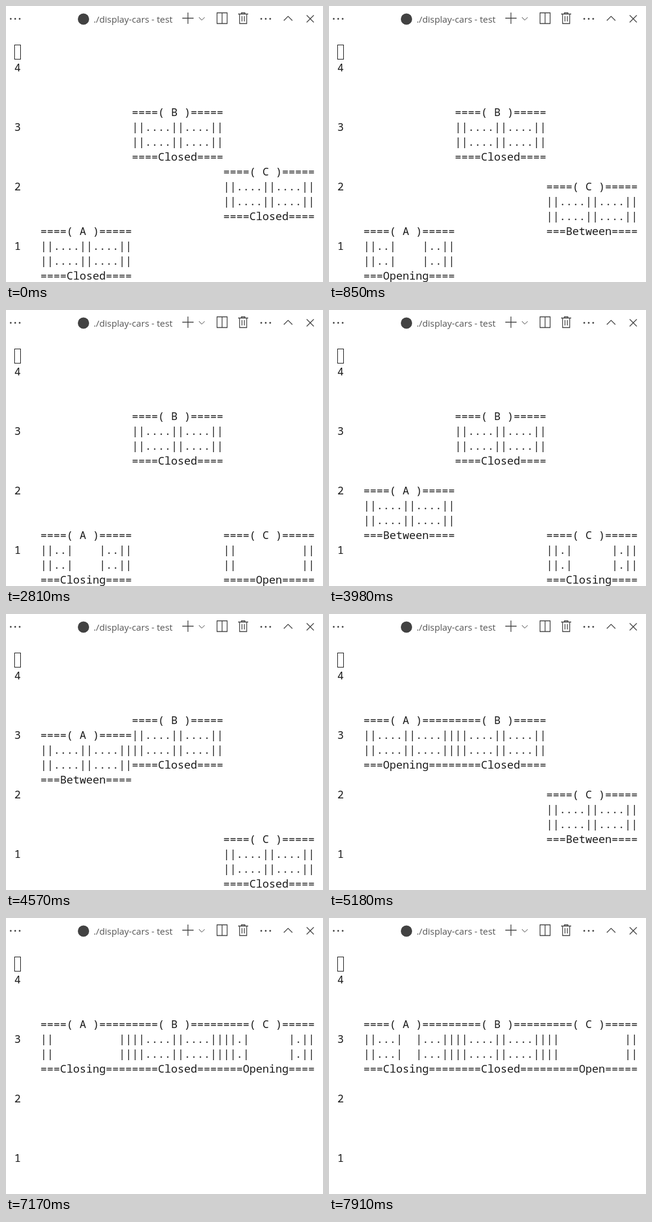
These frames come from a looping animation (534 by 464 pixels, 8 s). An HTML page with a canvas:

```html
<!DOCTYPE html>
<html lang="en">
<head>
<meta charset="utf-8">
<title>Elevator cars</title>
<style>
  html, body { margin: 0; width: 100%; height: 100%; overflow: hidden; background: #fff; }
  canvas, svg { position: absolute; left: 0; top: 0; }
  svg { fill: none; stroke: #424242; stroke-width: 1.3; }
  .dots { stroke-width: 3; stroke-linecap: round; stroke-dasharray: 0 7.5; }
  .mark { fill: #424242; stroke: none; }
  .title { font: 15.25px "Open Sans", sans-serif; fill: #555; stroke: none; }
</style>
</head>
<body>
<canvas id="screen" width="534" height="464"></canvas>
<svg width="534" height="44">
  <path class="dots" d="M8 21.5h15.1M430 21.5h15.1"/>
  <circle class="mark" cx="130.5" cy="22" r="9.5"/>
  <text class="title" x="147.5" y="28">./display-cars - test</text>
  <path d="M297 20.5h19M306.5 11v19"/>
  <path d="M325 19l4.8 4.8 4.8-4.8" stroke-width="1"/>
  <path d="M355.5 11.5h17v18h-17zM364 11.5v18"/>
  <path d="M391 13.5h17M396.5 13.5v-2h6v2M393.5 13.5v16h12v-16M397.5 17v9M401.5 17v9"/>
  <path d="M468 24.5l7.2-7.2 7.2 7.2"/>
  <path d="M506.5 15.5l12 12M518.5 15.5l-12 12"/>
</svg>
<script>
const LOOP = 8000, CELL = 11, LINE = 25, LEFT = 14, BASE = 110;
const DOOR_STEP = 200, TRIP = 1200;
const ctx = document.getElementById('screen').getContext('2d');

// Each order: start time, action and, for a trip, the floor to reach.
const cars = [
  { name: 'A', floor: 1, orders: [
    [280, 'open'], [2210, 'close'], [3385, 'go', 3], [5180, 'open'], [7110, 'close']] },
  { name: 'B', floor: 3, orders: [] },
  { name: 'C', floor: 2, orders: [
    [285, 'go', 1], [1590, 'open'], [3550, 'close'], [4580, 'go', 3], [6510, 'open']] }
];

const roofRow = floor => 15 - 4 * floor;

// door: dots per leaf, 4 = shut, -1 = fully open
function stateAt(car, t) {
  let row = roofRow(car.floor), door = 4, label = 'Closed';
  for (const [start, action, floor] of car.orders) {
    if (t < start) break;
    const step = Math.min(5, Math.floor((t - start) / DOOR_STEP));
    if (action === 'open') {
      door = 4 - step;
      label = step < 5 ? 'Opening' : 'Open';
    } else if (action === 'close') {
      door = step - 1;
      label = step < 5 ? 'Closing' : 'Closed';
    } else {
      const progress = Math.min(1, (t - start) / TRIP) ** 1.4;
      row += Math.trunc((roofRow(floor) - row) * progress);
      label = 'Between';
    }
  }
  return { row, door, label };
}

function print(text, col, row) {
  ctx.fillText(text, LEFT + col * CELL, BASE + row * LINE);
}

function doorLine(door) {
  if (door < 0) return '||' + ' '.repeat(10) + '||';
  const dots = '.'.repeat(door);
  return `||${dots}|${' '.repeat(8 - 2 * door)}|${dots}||`;
}

function floorLine(label) {
  const pad = Math.floor((14 - label.length) / 2);
  return ('='.repeat(pad) + label).padEnd(14, '=');
}

function draw(t) {
  ctx.fillStyle = '#fff';
  ctx.fillRect(0, 0, 534, 464);
  ctx.strokeStyle = ctx.fillStyle = '#1a1a1a';
  ctx.strokeRect(14.5, 65.5, 10, 24);
  ctx.font = '500 18.333px "Noto Sans Mono", monospace';
  for (let floor = 1; floor <= 4; floor++) print(floor, 0, roofRow(floor) + 1);
  cars.forEach((car, i) => {
    const { row, door, label } = stateAt(car, t);
    const doors = doorLine(door);
    [`====( ${car.name} )=====`, doors, doors, floorLine(label)]
      .forEach((line, n) => print(line, 4 + 14 * i, row + n));
  });
}

const start = performance.now();
function frame() {
  draw((performance.now() - start) % LOOP);
  requestAnimationFrame(frame);
}
frame();
</script>
</body>
</html>
```
